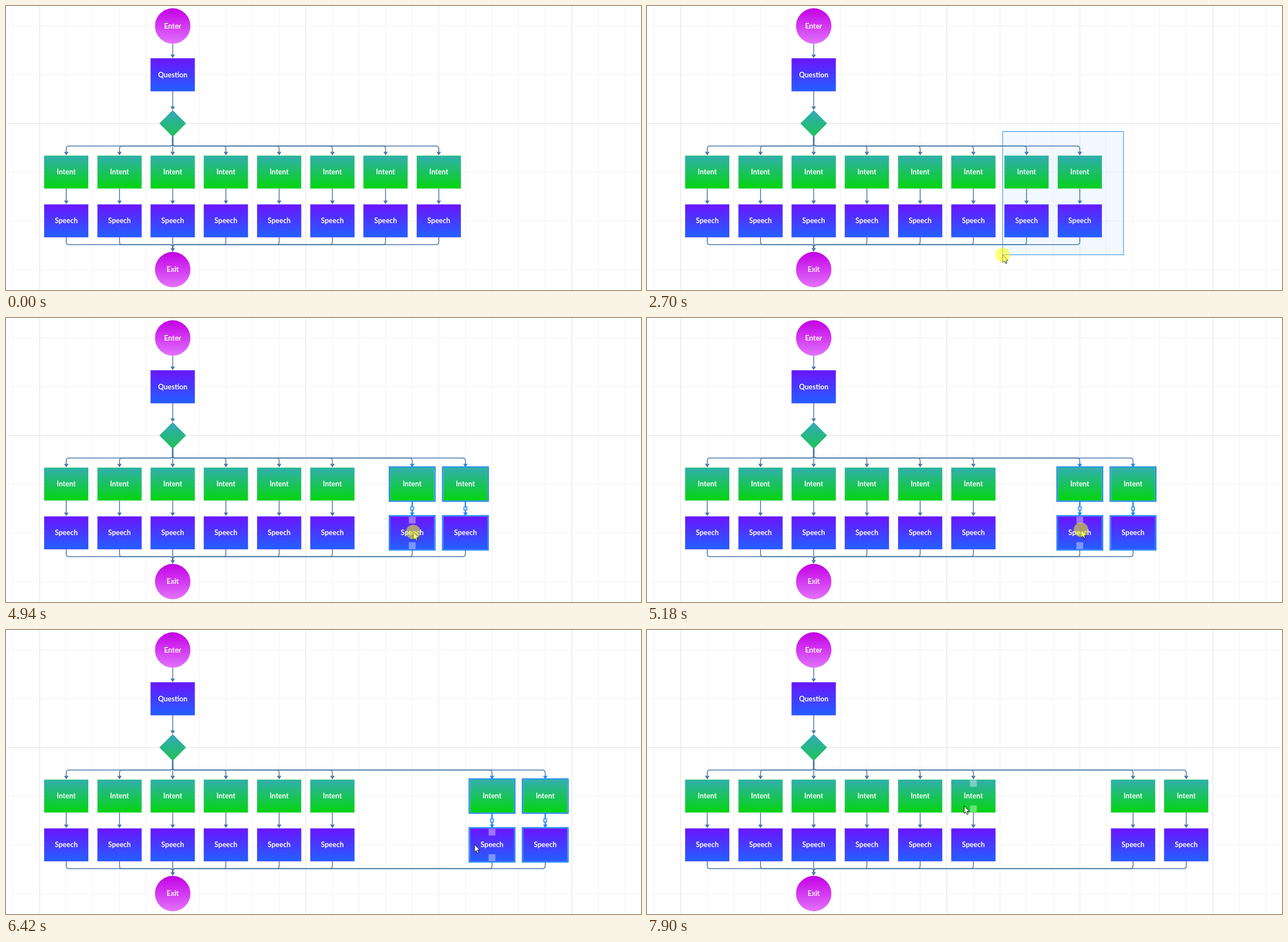
Recreate the animation shown at these times as an HTML page. Size 1118x501 px, loop 7.99 s.

```html
<!DOCTYPE html>
<html lang="en">
<head>
<meta charset="utf-8">
<title>Flow editor</title>
<style>
  html, body { margin: 0; width: 100%; height: 100%; overflow: hidden; background: #fff; }
  svg { display: block; width: 100%; height: 100%; }
  text { font: 700 12.5px Lato, sans-serif; fill: #fff; text-anchor: middle; }
  .edge { fill: none; stroke: #4f78a8; stroke-width: 1.5; }
  .tip { fill: #4f78a8; }
  .sel .edge { stroke: #1e88f5; stroke-width: 2.4; }
  .sel .tip { fill: #1e88f5; }
  .mark { fill: none; stroke: #1e88f5; stroke-width: 2.2; display: none; }
  .sel .mark { display: inline; }
  .knob { fill: #cfe6ff; stroke-width: 1.3; }
</style>
</head>
<body>
<svg id="stage" viewBox="0 0 1118 501">
  <defs>
    <linearGradient id="pink" x2="0" y2="1"><stop stop-color="#c300e6"/><stop offset="1" stop-color="#e273fb"/></linearGradient>
    <linearGradient id="blue" x2="0" y2="1"><stop stop-color="#6c14ff"/><stop offset="1" stop-color="#2160ff"/></linearGradient>
    <linearGradient id="green" x2="0" y2="1"><stop stop-color="#31aeb0"/><stop offset="1" stop-color="#04d50e"/></linearGradient>
    <linearGradient id="teal" x2="0" y2="1"><stop stop-color="#31a9bb"/><stop offset="1" stop-color="#1fc355"/></linearGradient>
  </defs>
</svg>
<script>
const LOOP = 7990, MID = 293.5, CELL = 46.85, ROW = 86;
const stage = document.getElementById('stage');

function add(parent, tag, attrs, text) {
  const el = document.createElementNS('http://www.w3.org/2000/svg', tag);
  for (const key in attrs) el.setAttribute(key, attrs[key]);
  if (text) el.textContent = text;
  parent.appendChild(el);
  return el;
}
function set(el, attrs) {
  for (const key in attrs) el.setAttribute(key, attrs[key]);
}
const show = (el, on) => el.style.display = on ? 'inline' : 'none';
const label = (parent, x, y, text) => add(parent, 'text', { x, y: y + 4.2 }, text);
const edge = (parent, d) => add(parent, 'path', { class: 'edge', d });
const tip = (parent, x, y) => add(parent, 'path', { class: 'tip', d: `M${x} ${y}l-4-6.2h8z` });

function arrow(parent, x, y1, y2) {
  edge(parent, `M${x} ${y1}V${y2 - 4}`);
  tip(parent, x, y2);
}
function box(parent, x, y, fill, text) {
  const stroke = fill === 'green' ? '#1fc64a' : '#4a38ff';
  add(parent, 'rect', { x: x - 38.6, y: y - 28.8, width: 77.2, height: 57.6, fill: `url(#${fill})`, stroke, 'stroke-width': .7 });
  label(parent, x, y, text);
}
function disc(y, text) {
  add(stage, 'circle', { cx: MID, cy: y, r: 31.2, fill: 'url(#pink)' });
  label(stage, MID, y, text);
}

// Background grid
for (let i = -6; i < 18; i++) {
  const stroke = i % 10 === -5 || i % 10 === 5 ? '#dfdfdf' : i % 5 ? '#f1f1f1' : '#e8e8e8';
  add(stage, 'path', { d: `M${MID + i * CELL} 0V501`, stroke });
}
for (let i = -2; i < 4; i++) {
  add(stage, 'path', { d: `M0 ${207.2 + i * ROW}H1118`, stroke: i ? '#f1f1f1' : '#dfdfdf' });
}

// Edges shared by all columns lie below the nodes
const buses = add(stage, 'g', {});
arrow(stage, MID, 66, 92);
disc(35.3, 'Enter');
arrow(stage, MID, 150, 183.5);
box(stage, MID, 121.3, 'blue', 'Question');
add(stage, 'path', { d: `M${MID} 183.8l23.5 23.5-23.5 23.5-23.5-23.5z`, fill: 'url(#teal)' });
tip(stage, MID, 433.5);
disc(465, 'Exit');

const columns = Array.from({ length: 8 }, (_, i) => {
  const x = MID + (i - 2) * 2 * CELL;
  const g = add(stage, 'g', {});
  tip(g, x, 263.5);
  arrow(g, x, 322, 349.5);
  add(g, 'rect', { class: 'mark knob', x: x - 2.7, y: 333.3, width: 5.4, height: 5.4 });
  [[293, 'green', 'Intent'], [379, 'blue', 'Speech']].forEach(([y, fill, text]) => {
    box(g, x, y, fill, text);
    add(g, 'rect', { class: 'mark', x: x - 40.2, y: y - 30.2, width: 80.4, height: 60.4 });
  });
  return { x, g, top: edge(buses, ''), bottom: edge(buses, ''), moves: i > 5 };
});

const ports = [-22.5, 22.5].map(dy =>
  add(stage, 'rect', { x: -6, y: dy - 6, width: 12, height: 12, fill: '#fff', opacity: .38 }));
const lasso = add(stage, 'rect', { fill: '#1e88f5', 'fill-opacity': .06, stroke: '#1e88f5', 'stroke-width': 1 });
const pointer = add(stage, 'g', {});
add(pointer, 'path', {
  d: 'M.3 .3V13.6L3.3 10.8 5.4 15.6 7.6 14.6 5.5 9.9H9.6Z',
  fill: '#fff', stroke: '#111', 'stroke-width': 1, 'stroke-linejoin': 'round'
});
const halo = add(pointer, 'circle', { r: 12.8, fill: '#ff0', opacity: .53 });

const linear = s => s, smooth = s => s * s * (3 - 2 * s);

// Pointer travel: start, end, steps, target, easing, optional bend
const travel = [
  [600, 1000, 6, [839, 223], smooth, [823, 310]],
  [1150, 1150, 1, [839, 221.5], linear],
  [2010, 2780, 11, [621, 444], smooth],
  [2850, 3010, 3, [618, 454], linear, [618, 464]],
  [3780, 4160, 6, [654, 383], s => s ** 1.12],
  [4710, 5500, 11, [827, 368], linear],
  [5560, 5730, 3, [834, 368], linear],
  [6420, 6740, 5, [744, 466], smooth],
  [7204, 7820, 9, [563, 326], smooth],
  [7900, 7900, 1, [558, 310], linear]
];

function pointerAt(t) {
  let at = [858, 398];
  for (const [from, to, n, goal, ease, bend] of travel) {
    if (t < from) break;
    const k = t >= to ? n : Math.min(n, Math.floor((t - from) / (to - from) * (n - 1) + .15) + 1);
    const s = ease(k / n), start = at;
    at = start.map((a, i) => {
      const c = bend ? bend[i] : (a + goal[i]) / 2;
      return a * (1 - s) ** 2 + 2 * c * s * (1 - s) + goal[i] * s * s;
    });
  }
  return at;
}

function busPaths(x) {
  const side = Math.sign(Math.round(x - MID));
  if (!side) return [`M${MID} 230V258`, `M${MID} 408V428`];
  const r = 5 * side;
  return [
    `M${MID} 230V242Q${MID} 247 ${MID + r} 247H${x - r}Q${x} 247 ${x} 252V258`,
    `M${x} 408V416Q${x} 421 ${x - r} 421H${MID + r}Q${MID} 421 ${MID} 426V428`
  ];
}

const within = (t, a, b) => t >= a && t < b;

function draw(t) {
  const [x, y] = pointerAt(t);
  const shift = t < 4710 ? 0 : t < 5960 ? Math.round((x - 654) / CELL) * CELL : 4 * CELL;
  const selected = within(t, 3460, 7275);

  let hover = null;
  for (const col of columns) {
    const cx = col.x + (col.moves ? shift : 0);
    const [top, bottom] = busPaths(cx);
    set(col.top, { d: top });
    set(col.bottom, { d: bottom });
    set(col.g, { transform: `translate(${cx - col.x} 0)`, class: col.moves && selected ? 'sel' : '' });
    for (const cy of [293, 379]) {
      if (Math.abs(x - cx) < 39 && Math.abs(y - cy) < 29) hover = [cx, cy];
    }
  }

  const dragging = within(t, 2010, 3390);
  show(lasso, dragging);
  if (dragging) set(lasso, { x, y: 221.5, width: 839 - x, height: Math.max(0, y - 221.5) });

  const active = hover && t >= 3780;
  for (const port of ports) {
    show(port, active);
    if (active) set(port, { transform: `translate(${hover})` });
  }

  show(pointer, t >= 600);
  show(halo, within(t, 1470, 3390) || within(t, 4560, 5960) || within(t, 7050, 7275));
  set(pointer, { transform: `translate(${x} ${y})` });
}

const begin = performance.now();
function tick() {
  draw((performance.now() - begin) % LOOP);
  requestAnimationFrame(tick);
}
tick();
</script>
</body>
</html>
```
